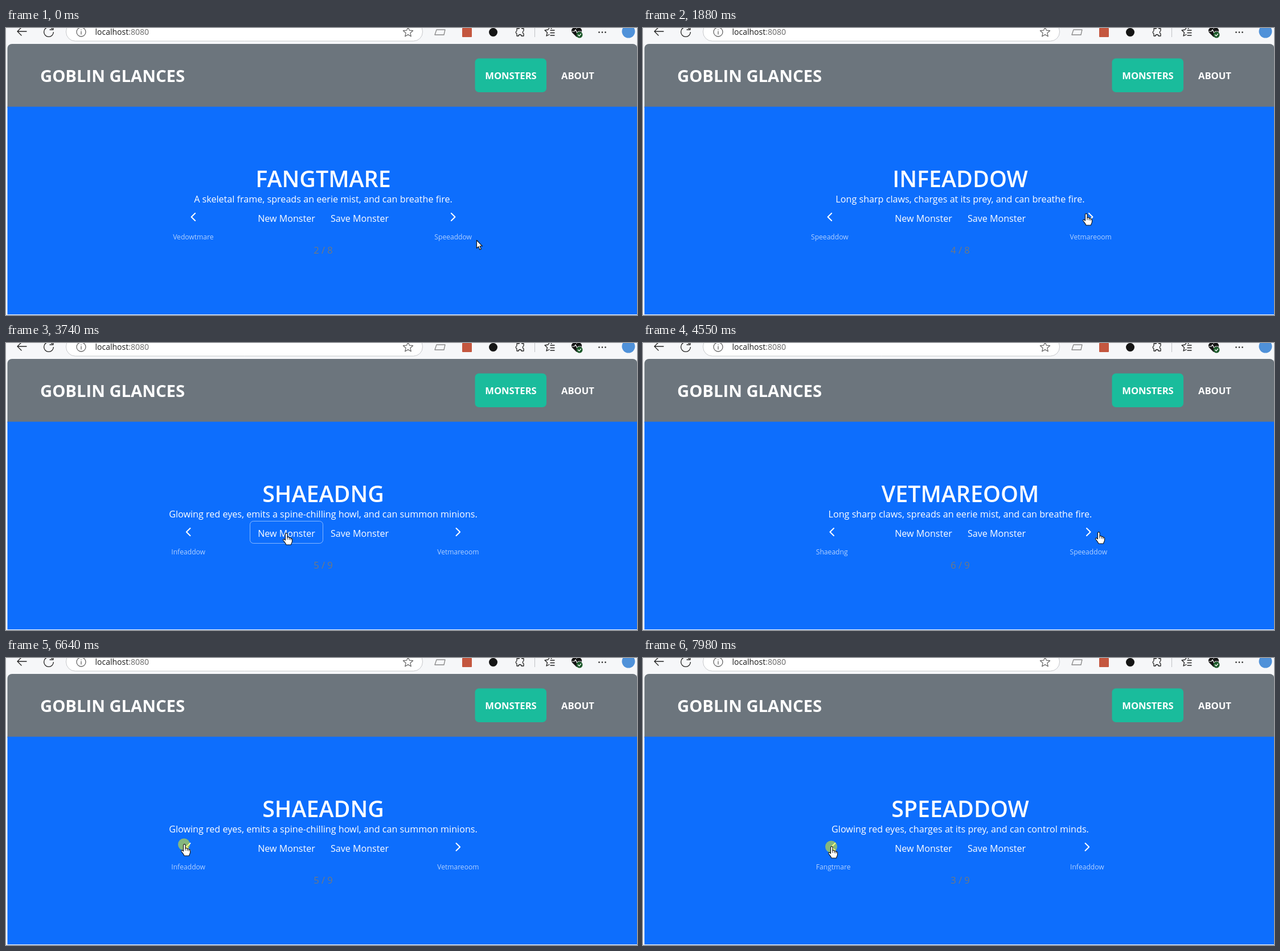
Write an HTML page with a canvas that moves like this. It is 1108 by 505 pixels and loops after 8 s.

```html
<!DOCTYPE html>
<html lang="en">
<head>
<meta charset="utf-8">
<title>Monsters</title>
<style>
  html, body { margin: 0; width: 100%; height: 100%; overflow: hidden; background: #fff; }
  canvas { display: block; width: 1108px; height: 505px; }
</style>
</head>
<body>
<canvas id="stage" width="1108" height="505"></canvas>
<script>
const ctx = document.getElementById('stage').getContext('2d');
const LOOP = 8000, FLASH = 70, MID = 557, ROW = 333;
const FONT = '"Open Sans", "Noto Sans", sans-serif';
const BLUE = '#0d6efd', GREY = '#6c757d';
const DESC_SIZE = 16.15, LABEL_SIZE = 12.1;

const about = {
  Fangtmare: 'A skeletal frame, spreads an eerie mist, and can breathe fire.',
  Speeaddow: 'Glowing red eyes, charges at its prey, and can control minds.',
  Infeaddow: 'Long sharp claws, charges at its prey, and can breathe fire.',
  Shaeadng: 'Glowing red eyes, emits a spine-chilling howl, and can summon minions.',
  Vetmareoom: 'Long sharp claws, spreads an eerie mist, and can breathe fire.'
};
const known = ['Vedowtmare', 'Fangtmare', 'Speeaddow', 'Infeaddow', 'Vetmareoom', 'Speeaddow'];
const FIRST = 1, KNOWN_TOTAL = 8;

const clicks = [
  { at: 390, act: 'next' }, { at: 1740, act: 'next' }, { at: 2400, act: 'next' },
  { at: 3620, act: 'new' }, { at: 4480, act: 'next' }, { at: 5020 },
  { at: 6030, act: 'prev' }, { at: 6640, act: 'prev' }, { at: 6970, act: 'prev' },
  { at: 7980, act: 'prev' }
];

// Pointer moves; it rests between them
const moves = [
  { end: 0, dur: 1, x: 826, y: 373 },
  { end: 190, dur: 190, x: 777, y: 333 },
  { end: 1000, dur: 400, x: 610, y: 368 },
  { end: 1600, dur: 540, x: 778, y: 327 },
  { end: 2140, dur: 140, x: 779, y: 332 },
  { end: 2900, dur: 200, x: 763, y: 378 },
  { end: 3410, dur: 500, x: 440, y: 372 },
  { end: 3620, dur: 70, x: 492, y: 335 },
  { end: 4410, dur: 650, x: 800, y: 333 },
  { end: 5480, dur: 200, x: 418, y: 351 },
  { end: 5880, dur: 400, x: 318, y: 333 },
  { end: 6640, dur: 80, x: 313, y: 328 },
  { end: 7570, dur: 500, x: 331, y: 332 }
];

const buttons = [['New Monster', 492.5], ['Save Monster', 621]];

function pointerAt(t) {
  let { x, y } = moves[0];
  for (const m of moves) {
    const k = Math.min(1, Math.max(0, 1 - (m.end - t) / m.dur));
    const ease = k * k * (3 - 2 * k);
    x += (m.x - x) * ease;
    y += (m.y - y) * ease;
  }
  return [Math.round(x), Math.round(y)];
}

// Replays the clicks up to t
function galleryAt(t) {
  const names = [...known];
  let i = FIRST;
  for (const c of clicks) {
    if (t < c.at + FLASH) break;
    if (c.act === 'next') i++;
    if (c.act === 'prev') i--;
    if (c.act === 'new') names.splice(i, 0, 'Shaeadng');
  }
  const total = KNOWN_TOTAL + names.length - known.length;
  return { name: names[i], prev: names[i - 1], next: names[i + 1], count: `${i + 1} / ${total}` };
}

function textWidth(str, size) {
  ctx.font = `400 ${size}px ${FONT}`;
  return ctx.measureText(str).width;
}

// Distance of both side buttons from the middle
function sideOffset({ name, prev, next }) {
  const label = Math.max(textWidth(prev, LABEL_SIZE), textWidth(next, LABEL_SIZE));
  return Math.max(label / 2 + 192.5, textWidth(about[name], DESC_SIZE) / 2 - 34);
}

function text(str, x, y, size, color, weight = 400, align = 'center') {
  ctx.font = `${weight} ${size}px ${FONT}`;
  ctx.textAlign = align;
  ctx.fillStyle = color;
  ctx.fillText(str, x, y);
}

function box(x, y, w, h, r, fill, stroke) {
  ctx.beginPath();
  ctx.roundRect(x, y, w, h, r);
  if (fill) { ctx.fillStyle = fill; ctx.fill(); }
  if (stroke) { ctx.strokeStyle = stroke; ctx.lineWidth = 1; ctx.stroke(); }
}

function disc(x, y, r, fill) {
  ctx.beginPath();
  ctx.arc(x, y, r, 0, 7);
  ctx.fillStyle = fill;
  ctx.fill();
}

function line(d, color, width = 1.3, x = 0, y = 0) {
  ctx.save();
  ctx.translate(x, y);
  ctx.lineCap = ctx.lineJoin = 'round';
  ctx.lineWidth = width;
  ctx.strokeStyle = color;
  ctx.stroke(new Path2D(d));
  ctx.restore();
}

function ring(x, y, r, color, from = 0, to = 2 * Math.PI) {
  ctx.beginPath();
  ctx.arc(x, y, r, from, to);
  ctx.strokeStyle = color;
  ctx.lineWidth = 1.3;
  ctx.stroke();
}

function star(x, y, r) {
  let d = '';
  for (let i = 0; i < 10; i++) {
    const a = i * Math.PI / 5 - Math.PI / 2, q = i % 2 ? r * 0.46 : r;
    d += `${i ? 'L' : 'M'}${x + q * Math.cos(a)} ${y + q * Math.sin(a)}`;
  }
  return d + 'Z';
}

function drawToolbar() {
  const ink = '#222', soft = '#666';
  ctx.fillStyle = '#f6f7f9';
  ctx.fillRect(0, 0, 1108, 40);
  box(105.5, -10, 626, 33, 16, '#fff', '#c6c8cb');
  line('M36 6H20M27-1L20 6L27 13', ink);
  ring(75, 7, 8.4, ink, 0, 5.6);
  line('M83-2V3H77', ink);
  ring(132, 7, 8, soft);
  line('M132 6V11M132 3V3.2', soft);
  text('localhost', 156.5, 12, 14, '#1b1b1b', 400, 'left');
  text(':8080', 156.5 + textWidth('localhost', 14), 12, 14, soft, 400, 'left');
  line(star(706, 7.5, 9), soft, 1.2);
  line('M756 3H771L769 12H753Z', '#888');
  box(801, 0, 17, 16, 1, '#c4573f');
  disc(855.5, 7.5, 7.5, '#151515');
  line('M897 1H901A2.6 2.6 0 0 1 906 1H909V5A2.7 2.7 0 0 0 909 10V14H905A2.5 2.5 0 0 0 900 14H897V10A2.7 2.7 0 0 1 897 5Z', ink);
  ctx.fillStyle = '#bfc1c4';
  ctx.fillRect(928, 0, 1, 16);
  line('M958 1L955-2L952 3L946 4L950.5 8L949 14L954 11.5', ink);
  for (const y of [4, 8.5, 13]) line('M0 0H7', ink, 1.3, 956, y);
  ctx.fillStyle = '#151515';
  ctx.fill(new Path2D('M1002 16L994 8C990 3 997-4 1002 1C1007-4 1014 3 1010 8Z'));
  line('M994 6H998L1000 3L1003 9L1005 6H1010', '#fff', 1.2);
  disc(1007, 12, 5.5, '#1d5a2b');
  line('M1004.5 12L1006.5 14L1009.5 10.5', '#fff', 1.2);
  for (const dx of [-5.5, 0, 5.5]) disc(1047 + dx, 7.5, 1.3, ink);
  disc(1093, 6, 11.5, '#4f91d9');
}

function drawPage() {
  ctx.fillStyle = '#fff';
  ctx.fillRect(0, 0, 1108, 505);
  drawToolbar();
  ctx.fillStyle = '#f3f4f6';
  ctx.fillRect(0, 28, 3, 477);
  box(2.5, 28, 1106, 112, [8, 8, 0, 0], GREY);
  ctx.fillStyle = BLUE;
  ctx.fillRect(2.5, 138.5, 1106, 365.5);
  text('GOBLIN GLANCES', 60, 95, 29.2, '#fff', 700, 'left');
  box(823.5, 53.5, 125.5, 59.5, 7, '#1abc9c');
  text('MONSTERS', 886.5, 90, 16.6, '#fff', 700);
  text('ABOUT', 1004, 90, 16.6, '#fff', 700);
}

function drawSide(label, x, dir) {
  const d = 3.3 * dir;
  line(`M${-d} -6.5L${d} 0L${-d} 6.5`, '#fff', 2, x, 332.5);
  text(label, x, 372, LABEL_SIZE, 'rgba(255,255,255,.68)');
}

function drawGallery(view, offset) {
  text(view.name.toUpperCase(), MID, 280, 39.4, '#fff', 600);
  text(about[view.name], MID, 307, DESC_SIZE, '#fff');
  drawSide(view.prev, MID - offset, -1);
  drawSide(view.next, MID + offset, 1);
  text(view.count, MID, 397, 16.6, '#73787e');
}

function drawButtons(px, py) {
  let over = false;
  for (const [label, x] of buttons) {
    if (Math.abs(px - x) < 64 && Math.abs(py - ROW) < 20) {
      box(x - 64, 313.5, 128, 39, 6, null, 'rgba(255,255,255,.5)');
      over = true;
    }
    text(label, x, 340.5, 16.1, '#fff');
  }
  return over;
}

function shape(d, x, y) {
  const p = new Path2D(d);
  ctx.save();
  ctx.translate(x, y);
  ctx.lineJoin = 'round';
  ctx.fillStyle = '#fff';
  ctx.strokeStyle = '#111';
  ctx.lineWidth = 1.1;
  ctx.fill(p);
  ctx.stroke(p);
  ctx.restore();
}

function drawPointer(x, y, kind) {
  if (kind === 'hand') {
    shape('M-1.5 1.5C-1.5-1 2-1 2 1.5V7C4 6 5 6.5 5.5 8C7 7 8 8 8.2 9C9.5 8.5 10.5 9.5 10.5 11V14C10.5 16 9 17 8.5 20H0C-1 17-3 15-5 12.5C-6 11-4.5 9.5-3 10.5L-1.5 12Z', x, y);
    line('M2 7V10.5M5.3 8.5V11M8 9.5V11.5', '#111', 0.9, x, y);
  } else if (kind === 'text') {
    line('M-3-8H3M0-8V8M-3 8H3', '#111', 1.1, x, y);
  } else {
    shape('M.5.5V14.5L3.7 11.6L6 17L8.3 16L6 10.8H10.5Z', x, y);
  }
}

function draw(t) {
  const view = galleryAt(t);
  const offset = sideOffset(view);
  const [px, py] = pointerAt(t);
  const fromSide = Math.abs(Math.abs(px - MID) - offset);
  drawPage();
  drawGallery(view, offset);
  const onButton = drawButtons(px, py);
  const onSide = fromSide < 30 && Math.abs(py - ROW) < 20;
  const onLabel = fromSide < 36 && Math.abs(py - 367) < 9;
  if (clicks.some(c => t >= c.at && t < c.at + FLASH)) {
    disc(px - 0.5, py, 10.5, 'rgba(255,255,0,.5)');
  }
  drawPointer(px, py, onButton || onSide ? 'hand' : onLabel ? 'text' : 'arrow');
}

const start = performance.now();
function tick() {
  draw((performance.now() - start) % LOOP);
  requestAnimationFrame(tick);
}
tick();
</script>
</body>
</html>
```
